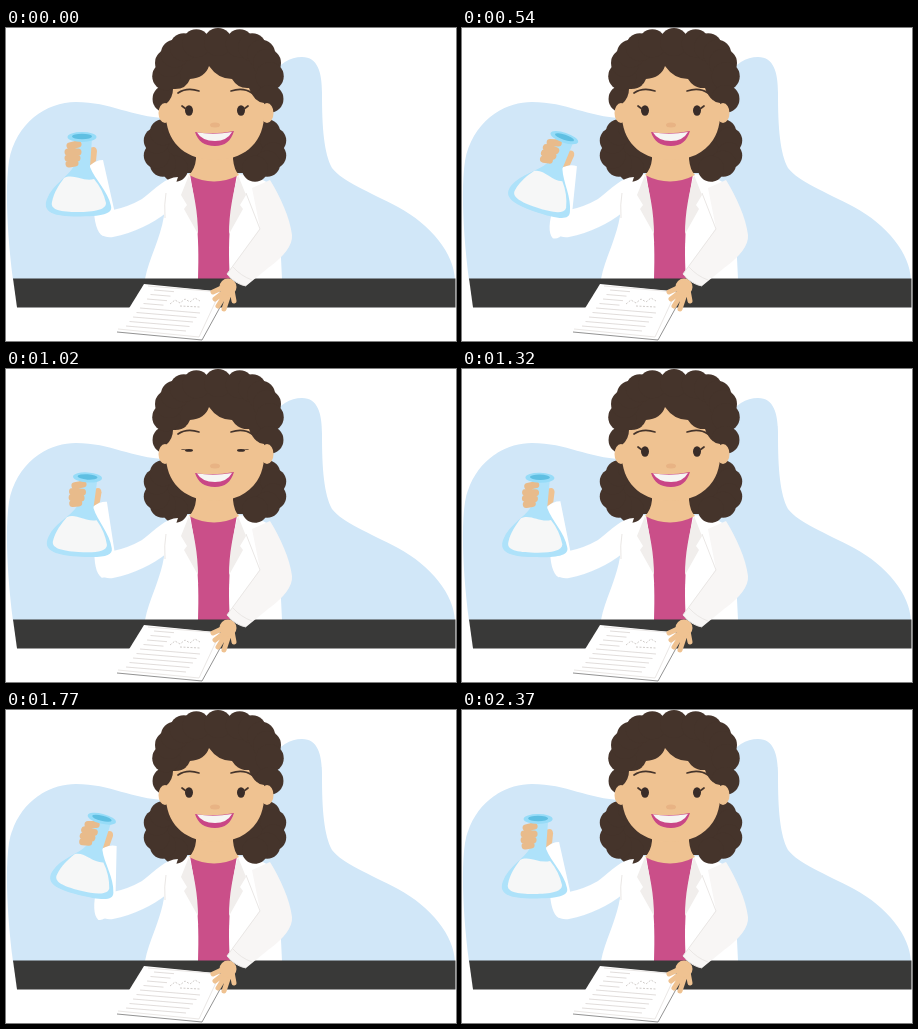
These frames come from a looping animation (450x313 px, 2400 ms). An HTML page:

```html
<!DOCTYPE html>
<html lang="en">
<head>
<meta charset="utf-8">
<title>Chemist at her desk</title>
<style>
  html, body { margin: 0; width: 100%; height: 100%; overflow: hidden; background: #fff; }
  svg { display: block; width: 100%; height: 100%; }
  .hair { fill: #45342b; }
  .skin { fill: #efc291; }
  .coat { fill: #fff; }
  .fold { fill: none; stroke: #eae7e5; }
  .line { fill: none; stroke: #45342b; stroke-width: 1.7; stroke-linecap: round; }
  .finger { fill: none; stroke: #efc291; stroke-width: 5; stroke-linecap: round; }
</style>
</head>
<body>
<svg viewBox="0 0 450 313">
  <path fill="#d1e7f8" d="M7 252C1 205-1 160 3 133C10 95 40 74 70 74C105 74 125 89 160 90L265 50C273 35 284 29 296 29C312 29 316 45 316 65C316 100 318 125 326 140C337 154 362 163 392 179C425 197 448 225 449 252Z"/>

  <!-- torso -->
  <path class="coat" d="M183 146C172 147 163 149 158 156V188C154 212 143 230 139 251H276L272 168C268 155 254 148 232 146Z"/>
  <path fill="#ca4f89" d="M184 146H231C226 175 221 205 224 251H192C194 205 189 175 184 146Z"/>
  <path id="lapel" fill="#f1eeec" d="M183 147L175 167L181 177L178 181L192 206C192 185 188 165 183 147Z"/>
  <use href="#lapel" transform="translate(415) scale(-1 1)"/>

  <!-- head -->
  <g id="curls" class="hair">
    <ellipse cx="212" cy="58" rx="56" ry="48"/>
    <path d="M161 60H260V120L246 145H172L158 120Z"/>
  </g>
  <path class="skin" d="M190 122H227V131Q228 142 233 147Q208 160 183 147Q189 141 190 131Z"/>
  <ellipse class="skin" cx="159" cy="85" rx="6.500" ry="10"/>
  <ellipse class="skin" cx="261" cy="85" rx="6.500" ry="10"/>
  <path class="skin" d="M160 76Q167 70 167 61Q180 62 184 51Q199 50 203 38Q212 51 226 51Q232 61 243 60Q248 74 258 75V90C256 117 236 132 209 132C182 132 162 117 160 90Z"/>
  <g id="half">
    <path class="line" d="M172 65Q181 59 193 63"/>
    <g id="eye">
      <ellipse cx="183" cy="82.500" rx="4" ry="5.200" fill="#392c28"/>
      <path class="line" d="M176 78L180 81"/>
    </g>
  </g>
  <use href="#half" transform="translate(418) scale(-1 1)"/>
  <ellipse cx="209" cy="97" rx="5" ry="2.500" fill="#e8b384"/>
  <path fill="#c94686" d="M189 104Q208 107 228 103C225 113 219 118 209 118C198 118 192 113 189 104Z"/>
  <path fill="#f6f5f3" d="M191 104.500Q208 107 226 104Q221 113 209 113Q196 113 191 104.500Z"/>

  <!-- raised arm -->
  <path class="coat" d="M172 149C160 149 150 160 136 171Q122 179 107 182L92 195C92 207 98 210 107 209C128 205 147 195 160 185Z"/>
  <path class="fold" d="M160 165Q158 176 159 190"/>
  <g id="forearm">
    <path class="coat" d="M83 138Q90 132 97 132L108 181C108 198 104 208 97 208C91 205 88 193 88 180Z"/>
    <path class="skin" d="M82 121Q90 116 91 123L90 133L83 138L77 137Z"/>
    <path fill="#aee2fa" d="M68 110L68 138C62 149 46 157 41 171C36 184 47 188.500 71 188.500C96 188.500 107 186 105 178C102 163 89 152 84 139L86 110Z"/>
    <path fill="#f6f7f7" d="M58 150C67 145 77 154 88 151C94 158 98 166 100 175C100 182 88 184 72 184C55 184 44 182 46 174C48 164 53 157 58 150Z"/>
    <path fill="none" stroke="#e8bb8b" stroke-width="7" stroke-linecap="round" d="M64 118L72 116M62 124H72M62 130H71M63 136L69 135"/>
    <ellipse cx="76" cy="109" rx="14.500" ry="5" fill="#97dcf8"/>
    <ellipse cx="76" cy="108.500" rx="10" ry="2.700" fill="#5fbfe2"/>
  </g>

  <path fill="#393938" d="M7 250.500H449.500V279.500H11Z"/>

  <!-- papers -->
  <path fill="#fff" d="M138 256L219 264L196 312L109 303Z"/>
  <path fill="none" stroke="#777" stroke-width=".8" d="M111 304L196 312L218 272"/>
  <path class="fold" d="M142 258L214 264L193 309L112 301"/>
  <path id="rules" fill="none" stroke="#dad5d2" stroke-width=".8"/>
  <path id="formula" fill="none" stroke="#c4bfbc" stroke-width=".8" stroke-dasharray="2 1.500"/>

  <!-- resting arm -->
  <path class="finger" d="M222 257L207 264M222 261L209 271M222 262L212 278M224 263L218 281M226 262L228 273"/>
  <circle class="skin" cx="222" cy="259" r="8.500"/>
  <path fill="#f8f6f5" d="M246 160L254 200L221 246Q229 256 240 258L262 240Q287 222 286 207C284 190 274 168 264 152Z"/>
  <path class="fold" d="M240 165L254 201L221 246Q229 256 240 258M227 239Q235 248 246 252"/>
</svg>
<script>
const byId = id => document.getElementById(id);
const LOOP = 2400, SWING = 1200, BLINK_EVERY = 600, BLINK_AT = 420;

// A scalloped arc of curls along a squarish ellipse; angles in degrees
function addCurls(cx, cy, rx, ry, radius, from, to, count) {
  const soften = v => Math.sign(v) * Math.abs(v) ** 0.7;
  for (let i = 0; i < count; i++) {
    const a = (from + (to - from) * i / (count - 1)) * Math.PI / 180;
    const curl = document.createElementNS('http://www.w3.org/2000/svg', 'circle');
    curl.setAttribute('cx', cx + rx * soften(Math.cos(a)));
    curl.setAttribute('cy', cy + ry * soften(Math.sin(a)));
    curl.setAttribute('r', radius);
    byId('curls').append(curl);
  }
}
addCurls(212, 58, 52, 44, 14, 170, 370, 13);
addCurls(209, 120, 59, 24, 13, 125, 235, 6);
addCurls(209, 120, 59, 24, 13, -55, 55, 6);

// Ruled text, shorter beside the formula
let rules = '', formula = 'M164 276';
for (let i = 0; i < 9; i++) {
  const length = i < 4 ? 20 : 60;
  rules += `M${148 - 3.5 * i} ${262 + 4.5 * i}l${length} ${length / 12}`;
}
for (let i = 0; i < 6; i++) formula += `l5 ${i % 2 ? 3 : -4}`;
byId('rules').setAttribute('d', rules);
byId('formula').setAttribute('d', formula + 'M174 278l20 1');

function blink(t) {
  if (t > 3 * BLINK_EVERY) return 0;
  const distance = Math.abs(t % BLINK_EVERY - BLINK_AT);
  return Math.min(1, Math.max(0, (100 - distance) / 60));
}

function draw(t) {
  const reach = t < SWING ? 19 : 14;
  const angle = reach * (1 - Math.cos(2 * Math.PI * t / SWING)) / 2;
  byId('forearm').setAttribute('transform', `rotate(${angle} 87 190)`);
  byId('eye').setAttribute('transform', `translate(0 81) scale(1 ${1 - 0.75 * blink(t)}) translate(0 -81)`);
}

const start = performance.now();
function tick() {
  draw((performance.now() - start) % LOOP);
  requestAnimationFrame(tick);
}
tick();
</script>
</body>
</html>
```
